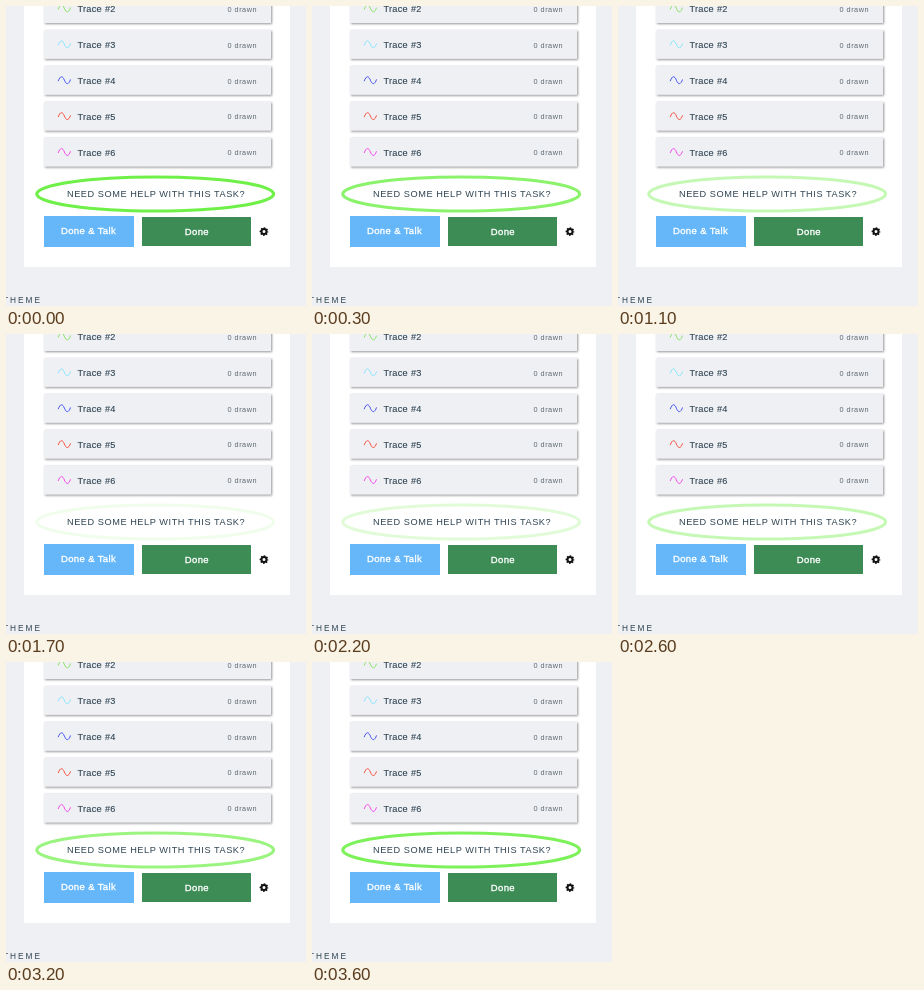
Write an HTML page that moves like this. It is 300 px wide and 300 px high and loops after 3800 ms.

```html
<!DOCTYPE html>
<html lang="en">
<head>
<meta charset="utf-8">
<title>Task panel</title>
<style>
  html, body { margin: 0; width: 100%; height: 100%; overflow: hidden; background: #eff0f4; }
  svg { display: block; width: 300px; height: 300px; }
  text { font-family: "Liberation Sans", Arial, sans-serif; fill: #2f4452; }
  .name { font-size: 9.2px; letter-spacing: .3px; stroke: #2f4452; stroke-width: .12px; }
  .count { font-size: 7.3px; letter-spacing: .5px; fill: #5c6870; }
  .help { font-size: 9.2px; letter-spacing: .55px; }
  .theme { font-size: 8.3px; letter-spacing: 2px; }
  .label { font-size: 9.5px; letter-spacing: .36px; fill: #fff; stroke: #fff; stroke-width: .35px; }
  .card { fill: #eff0f4; filter: drop-shadow(1px 1px .8px rgba(0, 0, 0, .42)); }
  .wave { fill: none; stroke-width: 1; stroke-linecap: round; }
  #ring { fill: none; stroke: #6ff048; stroke-width: 3.2; }
</style>
</head>
<body>
<svg viewBox="0 0 300 300">
  <rect x="18" y="-5" width="266" height="266" fill="#fff"/>
  <g id="cards"></g>
  <text class="help" x="61" y="191.4">NEED SOME HELP WITH THIS TASK?</text>
  <rect x="38" y="210" width="90" height="31" fill="#65b7fa"/>
  <text class="label" x="55" y="228">Done &amp; Talk</text>
  <rect x="136" y="211" width="109" height="29" fill="#3d8c56"/>
  <text class="label" x="178.8" y="229.4">Done</text>
  <g transform="translate(258 225.6)" stroke="#111" fill="none">
    <circle r="2.5" stroke-width="2"/>
    <circle r="3.6" stroke-width="1.6" stroke-dasharray="1.5 1.327" stroke-dashoffset=".75"/>
  </g>
  <text class="theme" x="-3" y="297.4">THEME</text>
  <ellipse id="ring" cx="149.2" cy="188" rx="118.4" ry="17"/>
</svg>
<script>
  const colors = ['#86e25f', '#86e6fb', '#4054f5', '#f5503f', '#f348ee'];
  document.getElementById('cards').innerHTML = colors.map((color, i) => `
    <g transform="translate(38 ${i * 35.9 - 12})">
      <rect class="card" width="227" height="29"/>
      <path class="wave" stroke="${color}" d="M14.3 15 C16.3 9.6 18.6 9.8 20.4 14.4 S24.6 19.2 26.4 14"/>
      <text class="name" x="33.4" y="18">Trace #${i + 2}</text>
      <text class="count" x="183.5" y="17.8">0 drawn</text>
    </g>`).join('');

  // Opacity falls to 0 and climbs back in tenths, holding each level.
  const loop = 3800;
  const steps = Array.from({ length: 20 }, (_, i) => {
    const time = i === 0 ? 0 : i <= 10 ? i * 200 - 100 : (i - 1) * 200;
    return { offset: time / loop, opacity: Math.abs(10 - i) / 10, easing: 'steps(1, end)' };
  });
  steps.push({ offset: 1, opacity: 1 });
  document.getElementById('ring').animate(steps, { duration: loop, iterations: Infinity });
</script>
</body>
</html>
```
